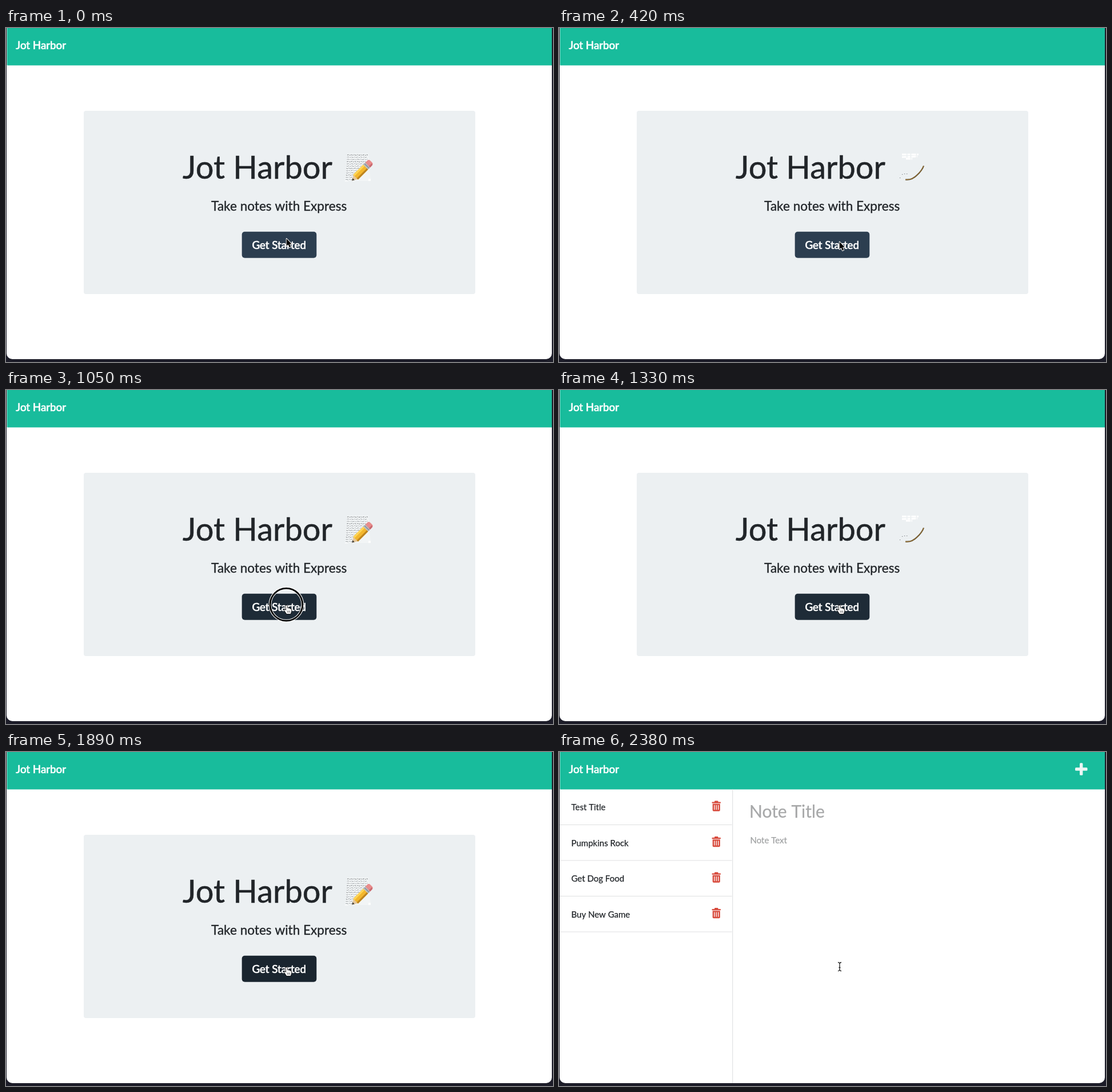
Recreate the animation shown at these times as an HTML page with a canvas. Size 957 by 585 pixels, loop 2450 ms.

```html
<!DOCTYPE html>
<html lang="en">
<head>
<meta charset="utf-8">
<title>Jot Harbor</title>
<style>
  html, body { margin: 0; width: 100%; height: 100%; overflow: hidden; background: #1c1c28; }
  canvas { display: block; width: 957px; height: 585px; }
</style>
</head>
<body>
<canvas id="stage" width="957" height="585"></canvas>
<script>
const ctx = document.getElementById('stage').getContext('2d');
const LOOP = 2450, STEP = 70;
const TEAL = '#18bc9c', INK = '#212529', RED = '#d84a3c';
const APP_NAME = 'Jot Harbor';
const NOTES = ['Test Title', 'Pumpkins Rock', 'Get Dog Food', 'Buy New Game'];
const CLICKS = [910, 1680];

const clamp01 = v => Math.min(1, Math.max(0, v));
const ease = v => v * v * (3 - 2 * v);

function box(x, y, w, h, color, radius = 0) {
  ctx.fillStyle = color;
  ctx.beginPath();
  ctx.roundRect(x, y, w, h, radius);
  ctx.fill();
}

function label(text, x, y, size, color, { align = 'left', heavy = 0.25 } = {}) {
  ctx.font = `${size}px Lato, sans-serif`;
  ctx.textAlign = align;
  ctx.lineJoin = 'round';
  ctx.lineWidth = heavy;
  ctx.fillStyle = ctx.strokeStyle = color;
  ctx.fillText(text, x, y);
  ctx.strokeText(text, x, y);
}

function at(x, y, angle, paint) {
  ctx.save();
  ctx.translate(x, y);
  ctx.rotate(angle);
  paint();
  ctx.restore();
}

function polygon(points, color) {
  ctx.beginPath();
  points.forEach(([x, y]) => ctx.lineTo(x, y));
  ctx.closePath();
  ctx.fillStyle = color;
  ctx.fill();
}

function mix(from, to, amount) {
  return `rgb(${from.map((c, i) => Math.round(c + (to[i] - c) * amount))})`;
}

function drawWindow() {
  box(0, 0, 957, 585, '#1c1c28');
  box(1, 0, 954, 580, '#fff', [0, 0, 10, 10]);
  box(1, 0, 1, 65, '#c4d2d0');
  box(2, 0, 953, 65.5, TEAL);
  label(APP_NAME, 17.3, 37, 18.75, '#fff', { heavy: 0.7 });
}

function drawPaper() {
  polygon([[597, 220], [634, 220], [638, 268], [593, 268]], 'rgba(255,255,255,.3)');
  ctx.lineWidth = 1;
  for (let row = 0; row < 12; row++) {
    const y = 222.5 + row * 3.9;
    const start = 597 - row * 0.25;
    const end = row < 4 ? 633 : 628 - (row - 4) * 2.6;
    ctx.strokeStyle = row % 3 ? '#9a9ea2' : '#74787c';
    ctx.setLineDash([3 + row % 3, 1.4, 2, 1]);
    ctx.beginPath();
    ctx.moveTo(start, y);
    for (let x = start + 2; x <= end; x += 2) ctx.lineTo(x, y + Math.sin(x * 2 + row) * 0.7);
    ctx.stroke();
  }
  ctx.setLineDash([]);
  box(593, 267.5, 5, 1, '#fff');
  box(634, 264, 4, 4, 'rgba(255,255,255,.8)');
}

function drawPencil() {
  at(605.3, 267.5, -Math.PI / 4, () => {
    polygon([[0, 0], [10, -6], [10, 6]], '#e5c799');
    polygon([[0, 0], [4, -2.4], [4, 2.4]], '#45413c');
    box(9, -6, 25, 12, '#f3b72d');
    box(9, -6, 25, 3.5, '#ffd557');
    box(9, 3, 25, 3, '#bd8420');
    box(34, -6, 6, 12, '#b6bbc0');
    box(36, -6, 1.3, 12, '#858b91');
    box(39, -6, 8.5, 12, '#e88c8c', [0, 4, 4, 0]);
    box(39, 3, 7, 3, '#c86970', [0, 0, 3, 0]);
  });
}

function drawSparseMemo() {
  ctx.strokeStyle = '#fff';
  ctx.setLineDash([8, 1.5, 5, 2]);
  ctx.lineWidth = 3;
  ctx.beginPath();
  ctx.moveTo(600, 221.5); ctx.lineTo(629, 221.5);
  ctx.moveTo(600, 226); ctx.lineTo(627, 225);
  ctx.moveTo(607, 229); ctx.lineTo(618, 229);
  ctx.stroke();
  ctx.setLineDash([]);
  for (const [color, width] of [['#514326', 2.2], ['#b78538', 0.9]]) {
    ctx.strokeStyle = color;
    ctx.lineWidth = width;
    ctx.beginPath();
    ctx.moveTo(606, 265.5);
    ctx.quadraticCurveTo(617, 267, 626, 258);
    ctx.quadraticCurveTo(635, 250, 638, 241.5);
    ctx.stroke();
  }
  for (const [x, y] of [[596, 262], [600, 256], [604, 255], [608, 255]]) {
    box(x, y, 1.3, 1, '#777b7e');
  }
}

function buttonColor(t) {
  const normal = [44, 62, 80], hover = [30, 43, 55], active = [26, 37, 47];
  return t < CLICKS[1]
    ? mix(normal, hover, ease(clamp01((t - CLICKS[0]) / 150)))
    : mix(hover, active, ease(clamp01((t - CLICKS[1]) / 150)));
}

function drawHome(t) {
  box(136, 145, 685, 321, '#ecf0f2', 4);
  label(APP_NAME, 309, 264, 56, INK, { heavy: 0.5 });
  const sparse = (t >= 420 && t < 910) || (t >= 1120 && t < 1470);
  if (sparse) {
    drawSparseMemo();
  } else {
    drawPaper();
    drawPencil();
  }
  label('Take notes with Express', 477.7, 320, 22.6, INK, { align: 'center', heavy: 0.35 });
  box(412.7, 356.8, 130.6, 46, buttonColor(t), 5);
  label('Get Started', 477.7, 386.5, 18.75, '#fff', { align: 'center', heavy: 0.7 });
}

function drawTrash(x, y) {
  box(x, y + 2, 15.5, 2.3, RED, 0.8);
  box(x + 4.5, y, 6.5, 3, RED, 1);
  box(x + 1.2, y + 5.3, 13.1, 13, RED, [0, 0, 2, 2]);
  for (const dx of [3.7, 7.1, 10.5]) box(x + dx, y + 7.3, 1.3, 8.5, '#fff', 0.6);
}

function drawEditor(t) {
  const plus = '#eaf6f4';
  box(903, 27.3, 21.5, 5.4, plus, 1.5);
  box(911, 19.2, 5.4, 21.5, plus, 1.5);
  box(303, 65.5, 1.3, 514.5, '#e2e4e5');
  label('Note Title', 333, 115, 30, '#a7a8a9');
  label('Note Text', 334.5, 160, 15, '#a0a2a3');
  if (t < 2030) return;
  NOTES.forEach((note, i) => {
    const y = i * 62.5;
    label(note, 21.5, 102 + y, 15, INK);
    drawTrash(267.5, 85.5 + y);
    box(1, 127 + y, 301.5, 1, '#dfe0e1');
  });
}

function outlined(path, x, y, fill, edge, width) {
  at(x, y, 0, () => {
    ctx.lineJoin = 'round';
    ctx.lineWidth = width;
    ctx.strokeStyle = edge;
    ctx.fillStyle = fill;
    ctx.stroke(path);
    ctx.fill(path);
  });
}

const arrow = new Path2D('M0 0V13L3 10.3L5.2 15.3L7.5 14.3L5.3 9.5H9.2Z');
const hand = new Path2D('M-1 1Q0-1 1.3 1L2 6L2.6 4.5Q4 4 4.4 6Q6 4.5 6.6 6.5Q8.5 6 8.7 8V11L7.3 15H.5L-3.5 9Q-3.7 7-2 7.8L-.3 9.3Z');
const beam = new Path2D('M-3-7.5Q0-7.5 0-5Q0-7.5 3-7.5M0-5V5M-3 7.5Q0 7.5 0 5Q0 7.5 3 7.5M-1.5 1.5H1.5');

function drawCursor(t) {
  if (t >= 2380) {
    at(491, 376, 0, () => {
      for (const [color, width] of [['#fff', 3], ['#222', 1.3]]) {
        ctx.strokeStyle = color;
        ctx.lineWidth = width;
        ctx.stroke(beam);
      }
    });
  } else if (t >= 910 && t < 1960) {
    outlined(hand, 490.5, 377, '#fff', '#111', 1.7);
    ctx.strokeStyle = '#333';
    ctx.lineWidth = 0.7;
    ctx.beginPath();
    for (const x of [492.5, 494.5, 496.5]) {
      ctx.moveTo(x, 386.5);
      ctx.lineTo(x, 390);
    }
    ctx.stroke();
  } else {
    const y = t >= 1960 ? 376 : 369 + 5.5 * ease(clamp01(t / 420));
    outlined(arrow, 490.7, y, '#000', '#fff', 1.8);
  }
}

function drawClick(t) {
  if (!CLICKS.some(start => t >= start && t < start + 210)) return;
  for (const [color, width] of [['#fff', 4.8], ['#000', 2.8]]) {
    ctx.strokeStyle = color;
    ctx.lineWidth = width;
    ctx.beginPath();
    ctx.arc(490.4, 375.8, 28.4, 0, Math.PI * 2);
    ctx.stroke();
  }
}

function draw(elapsed) {
  const t = Math.floor((elapsed % LOOP) / STEP) * STEP;
  drawWindow();
  if (t < 1960) drawHome(t);
  else drawEditor(t);
  drawClick(t);
  drawCursor(t);
}

const started = performance.now();
function tick() {
  draw(performance.now() - started);
  requestAnimationFrame(tick);
}
tick();
</script>
</body>
</html>
```
